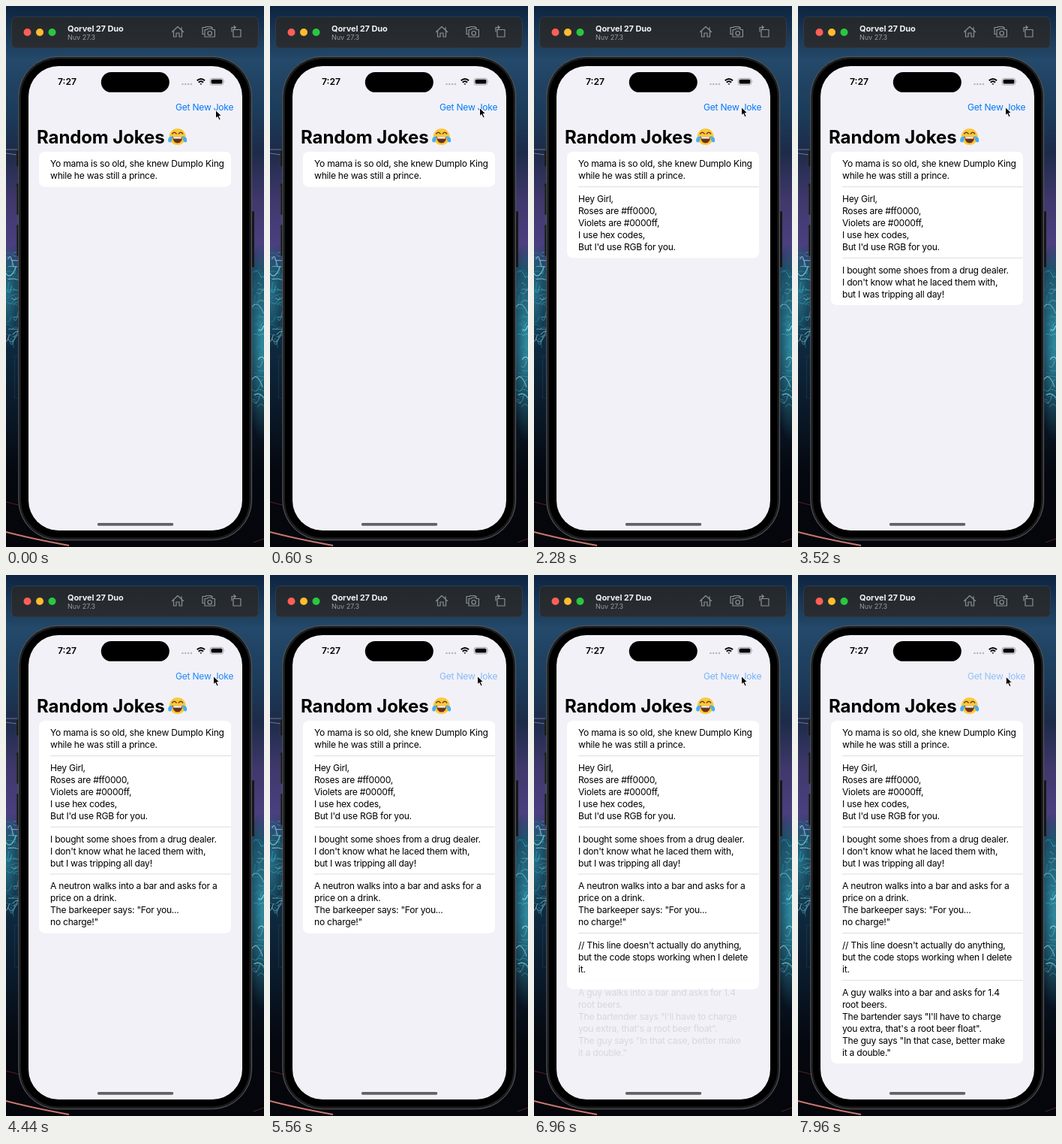
Animation, 344 px wide and 720 px high, one loop 8 s. Source, as an HTML page:

```html
<!DOCTYPE html>
<html lang="en">
<head>
<meta charset="utf-8">
<title>Random Jokes</title>
<style>
  html, body { margin: 0; width: 100%; height: 100%; overflow: hidden; background: #07101c; }
  svg { display: block; width: 344px; height: 720px; font-family: Inter, sans-serif; }
  .body { font-size: 12.1px; letter-spacing: -.25px; }
  .icon { fill: none; stroke: #8b9096; stroke-width: 1.2; stroke-linejoin: round; stroke-linecap: round; }
</style>
</head>
<body>
<svg viewBox="0 0 344 720">
  <defs>
    <linearGradient id="wall" x2="0" y2="1">
      <stop offset="0" stop-color="#0d2440"/>
      <stop offset=".1" stop-color="#24496a"/>
      <stop offset=".2" stop-color="#1c3b5a"/>
      <stop offset=".27" stop-color="#1d2b48"/>
      <stop offset=".36" stop-color="#40386c"/>
      <stop offset=".44" stop-color="#4b3f80"/>
      <stop offset=".49" stop-color="#164058"/>
      <stop offset=".61" stop-color="#0e2c42"/>
      <stop offset=".74" stop-color="#0a1a2b"/>
      <stop offset=".86" stop-color="#05080f"/>
      <stop offset="1" stop-color="#05060b"/>
    </linearGradient>
    <linearGradient id="bar" x2="0" y2="1">
      <stop offset="0" stop-color="#23282d"/>
      <stop offset="1" stop-color="#292d32"/>
    </linearGradient>
    <radialGradient id="glow">
      <stop offset="0" stop-color="#3fb3c8" stop-opacity=".7"/>
      <stop offset="1" stop-color="#3fb3c8" stop-opacity="0"/>
    </radialGradient>
  </defs>

  <rect width="344" height="720" fill="url(#wall)"/>
  <ellipse cx="342" cy="450" rx="24" ry="130" fill="url(#glow)"/>
  <ellipse cx="2" cy="385" rx="18" ry="70" fill="url(#glow)" opacity=".6"/>
  <g id="sparks" fill="none" stroke-linecap="round"></g>
  <path d="M0 191h15M0 196l14 2" stroke="#a7a3bd" stroke-width="1.2" opacity=".6"/>
  <path d="M0 700q34 9 84 18" fill="none" stroke="#c9786f" stroke-width="2"/>
  <path d="M0 660l20 5M330 714l14-5" stroke="#7d2c30" opacity=".7"/>

  <!-- simulator toolbar -->
  <rect x="7.5" y="14.5" width="329" height="41.5" rx="6" fill="url(#bar)" stroke="#3a4149" stroke-width=".7"/>
  <circle cx="28.5" cy="35" r="5" fill="#ff5f57"/>
  <circle cx="45" cy="35" r="5" fill="#febc2e"/>
  <circle cx="61.5" cy="35" r="5" fill="#28c840"/>
  <text x="82" y="33.6" font-size="11" font-weight="700" letter-spacing="-.1" fill="#f1f2f3">Qorvel 27 Duo</text>
  <text x="82" y="45.2" font-size="9" fill="#999da2">Nuv 27.3</text>
  <g class="icon">
    <path d="M221.5 34.5L229 27.5l7.5 7M223.5 33v8h3.5v-5h4v5h3.5v-8M234 31.5v-3"/>
    <path d="M264 37.5h-2v-9h4l1-1h6l1 1h1v1.5"/>
    <path d="M265 31.5h3l1.2-1.5h5l1.2 1.5h3v9.500h-13.400z"/>
    <circle cx="271.7" cy="36.2" r="2.7"/>
    <path d="M303 31.5h10v9.500h-10zM301 34v-5.500h5M304 26.500l2.200 2-2.200 2"/>
  </g>

  <!-- phone -->
  <g fill="#101113" stroke="#3b3e42" stroke-width=".6">
    <rect x="14" y="192" width="4" height="22" rx="1"/>
    <rect x="14" y="236" width="4" height="42" rx="1"/>
    <rect x="14" y="291" width="4" height="42" rx="1"/>
    <rect x="326" y="273" width="5" height="75" rx="1"/>
  </g>
  <path d="M14.5 240v200M11.5 466v56h4M11.5 466h4" fill="none" stroke="#3c5361" stroke-width=".6" opacity=".6"/>
  <rect x="16.8" y="67.3" width="310.8" height="643.5" rx="53" fill="#1c1d1f" stroke="#5b5d60"/>
  <rect x="20" y="70.5" width="304.5" height="637" rx="50"/>
  <rect x="30" y="80" width="285" height="618" rx="40" fill="#f2f1f7"/>
  <rect x="126.8" y="88" width="91" height="26.8" rx="13.4"/>
  <text x="69" y="105.3" font-size="12.2" font-weight="600">7:27</text>
  <g fill="#b9b9be">
    <circle cx="235.5" cy="104" r="1.3"/><circle cx="239.3" cy="104" r="1.3"/>
    <circle cx="243.1" cy="104" r="1.3"/><circle cx="246.9" cy="104" r="1.3"/>
  </g>
  <g fill="none" stroke="#000" stroke-width="1.9">
    <path d="M254.7 99.2q5.2-4.6 10.400 0M256.7 101.7q3.2-2.7 6.4 0"/>
    <path d="M258.3 103.2h3.2l-1.6 1.9z" fill="#000" stroke="none"/>
  </g>
  <rect x="272.2" y="96.4" width="17.6" height="8.6" rx="2.6" fill="none" stroke="#929297" stroke-width=".8"/>
  <rect x="273.6" y="97.8" width="14.8" height="5.8" rx="1.5"/>
  <path d="M290.7 99.3q1.5 1.4 0 2.8z" fill="#929297"/>

  <text id="button" class="body" x="226" y="139.3" fill="#007aff">Get New Joke</text>
  <text x="41" y="182.7" font-size="24" font-weight="700" letter-spacing="-.1">Random Jokes</text>
  <g transform="translate(228.7 174)">
    <circle r="11" fill="#fdc93b"/>
    <path d="M-7-4q2.7-3.5 5.4 0M1.6-4q2.7-3.5 5.4 0" fill="none" stroke="#68411b" stroke-width="1.5" stroke-linecap="round"/>
    <path d="M-6.5 0h13q-.5 8.5-6.5 8.5T-6.5 0z" fill="#6b321a"/>
    <path d="M-5.8.3h11.6l-.6 2.2H-5.2z" fill="#fff"/>
    <path id="tear" d="M-6.5-1q-6 1-6 5.3t3.6 2.8Q-7 5-6.5-1z" fill="#4aaef0"/>
    <use href="#tear" transform="scale(-1 1)"/>
  </g>

  <rect id="card" x="44" y="194" width="256" rx="7.3" fill="#fff"/>
  <g id="rows" class="body"></g>
  <rect x="121.8" y="688" width="101.5" height="3.7" rx="1.85" fill="#626166"/>

  <path id="cursor" d="M0 0v11.3l2.6-2.4 2 4.5 2.1-.9-2-4.4h3.6z" stroke="#fff" stroke-linejoin="round"/>
</svg>

<script>
const LOOP = 8000, LINE = 16.02, PADDING = 14.6, CARD_TOP = 194;
const PRESSES = [620, 2500, 3960, 5400, 6750, 7900];
const HOLD = 120, RELEASE = 450, FETCH = 150, INSERT = 300;
const JOKES = [
  ["Yo mama is so old, she knew Dumplo King", "while he was still a prince."],
  ["Hey Girl,", "Roses are #ff0000,", "Violets are #0000ff,", "I use hex codes,", "But I'd use RGB for you."],
  ["I bought some shoes from a drug dealer.", "I don't know what he laced them with,", "but I was tripping all day!"],
  ["A neutron walks into a bar and asks for a", "price on a drink.", "The barkeeper says: \"For you...", "no charge!\""],
  ["// This line doesn't actually do anything,", "but the code stops working when I delete", "it."],
  ["A guy walks into a bar and asks for 1.4", "root beers.", "The bartender says \"I'll have to charge",
   "you extra, that's a root beer float\".", "The guy says \"In that case, better make", "it a double.\""]
];
// Pointer moves: start, end, destination
const MOVES = [[200, 500, 279.5, 135.5], [1500, 1850, 276.5, 134.5], [7550, 7750, 277.3, 135.2]];

const byId = id => document.getElementById(id);
const clamp = v => Math.min(1, Math.max(0, v));
const ease = v => { v = clamp(v); return v * v * (3 - 2 * v); };

function add(parent, tag, attributes, text = "") {
  const node = document.createElementNS("http://www.w3.org/2000/svg", tag);
  for (const name in attributes) node.setAttribute(name, attributes[name]);
  node.textContent = text;
  return parent.appendChild(node);
}

let seed = 7;
const random = () => (seed = seed * 16807 % 2147483647) / 2147483647;
for (let i = 0; i < 80; i++) {
  const right = i % 2;
  const x = (right ? 327 : -3) + random() * 14;
  const y = right ? 350 + random() * 190 : 325 + random() * 130;
  const dx = 4 + random() * 12, dy = random() * 24 - 12;
  add(byId("sparks"), "path", {
    d: `M${x} ${y}q${dx / 2} ${-dy} ${dx} ${dy}`,
    stroke: i % 3 ? "#35a6bd" : "#a5e4ec", "stroke-width": .4 + random() * .8, opacity: .35 + random() * .5
  });
}

let rowTop = CARD_TOP;
const rows = JOKES.map((lines, index) => {
  const node = add(byId("rows"), "g", {});
  if (index) add(node, "path", { d: `M59 ${rowTop}H300`, stroke: "#d5d5d9", "stroke-width": .8 });
  lines.forEach((line, i) => add(node, "text", { x: 59, y: rowTop + 20.2 + i * LINE }, line));
  const height = lines.length * LINE + PADDING;
  rowTop += height;
  return { node, height };
});

function draw(time) {
  let height = 0;
  rows.forEach((row, i) => {
    const shown = i ? ease((time - PRESSES[i - 1] - FETCH) / INSERT) : 1;
    row.node.setAttribute("opacity", shown);
    height += row.height * shown;
  });
  byId("card").setAttribute("height", height);

  const press = PRESSES.filter(t => t <= time).pop();
  const recovered = press === undefined ? 1 : clamp((time - press - HOLD) / RELEASE);
  byId("button").setAttribute("opacity", .4 + .6 * recovered);

  let x = 279.5, y = 138.5;
  for (const [start, end, toX, toY] of MOVES) {
    const p = ease((time - start) / (end - start));
    x += (toX - x) * p;
    y += (toY - y) * p;
  }
  byId("cursor").setAttribute("transform", `translate(${x} ${y})`);
}

const began = performance.now();
function tick() {
  draw((performance.now() - began) % LOOP);
  requestAnimationFrame(tick);
}
tick();
</script>
</body>
</html>
```
